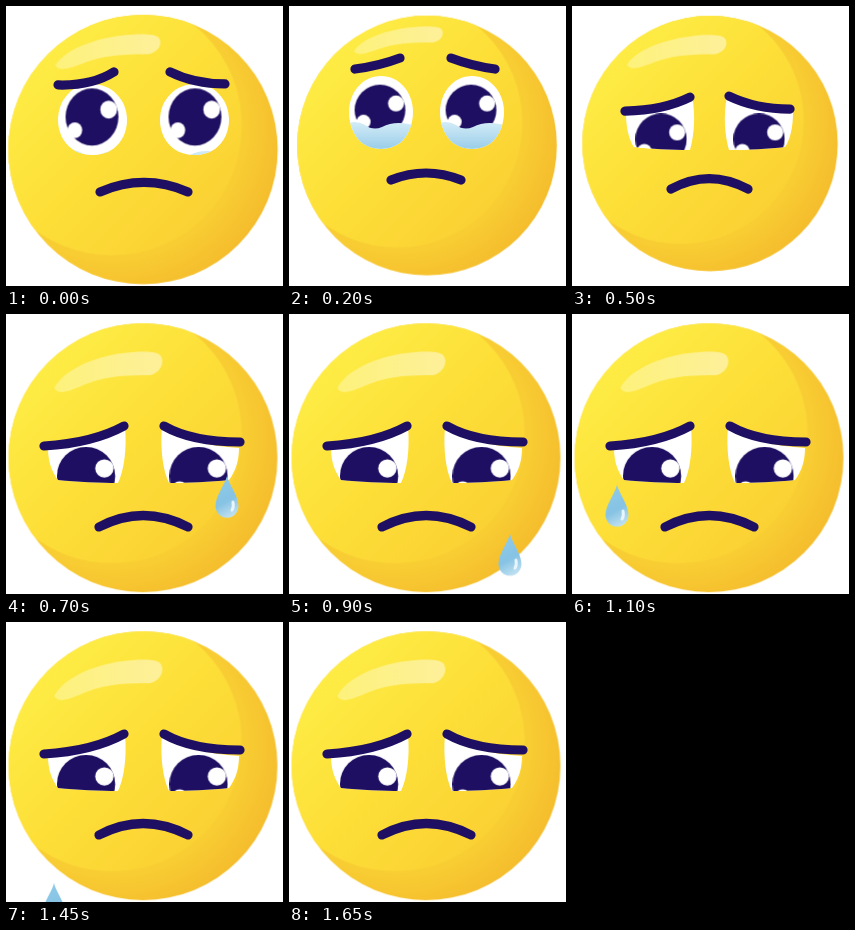
Animation, 277 px wide and 280 px high, one loop 1700 ms. Source, as an HTML page:

```html
<!DOCTYPE html>
<html lang="en">
<head>
<meta charset="utf-8">
<title>Crying face</title>
<style>
  html, body { margin: 0; width: 100%; height: 100%; overflow: hidden; background: #fff; }
  svg { display: block; width: 100vw; height: 100vh; }

  svg * { animation: 1700ms linear infinite; }
  .line { fill: none; stroke: #1f0f62; stroke-width: 9.2; stroke-linecap: round; }
  .white { fill: #fff; }
  .navy { fill: #1f0f62; }

  .face { animation-name: face; }
  .shine { animation-name: shine; }
  .eye { animation-name: eye; }
  .brow-l { animation-name: brow-l; }
  .brow-r { animation-name: brow-r; }
  .mouth { animation-name: mouth; }
  .pupil-l { animation-name: pupil-l; }
  .pupil-r { animation-name: pupil-r; }
  .water { animation-name: water; }
  .tear-r { animation-name: tear-r; }
  .tear-l { animation-name: tear-l; }

  /* Easing of the three moves between poses */
  svg { --rise: ease-out; --sink: cubic-bezier(.55, 0, .85, .65); --settle: ease-out; }

  /* Poses: wide-eyed 0, welling up 200 ms, squint 500 ms, sad from 700 ms */
  @keyframes face {
    0% { transform: translate(137px, 143.5px) scale(.998); animation-timing-function: var(--rise); }
    11.765% { transform: translate(138px, 139.5px) scale(.962); animation-timing-function: var(--sink); }
    29.412% { transform: translate(138px, 137.5px) scale(.946); animation-timing-function: var(--settle); }
    41.176%, 100% { transform: translate(137px, 143.7px) scale(.996); }
  }
  @keyframes shine {
    0% { transform: translate(17px, -116px) scale(.97, .86); animation-timing-function: var(--rise); }
    11.765% { transform: translate(16px, -124px) scale(.85, .7); animation-timing-function: var(--sink); }
    29.412% { transform: translate(17px, -115px) scale(.97, .86); animation-timing-function: var(--settle); }
    41.176%, 100% { transform: translate(19px, -107px); }
  }
  @keyframes eye {
    0% { d: path("M52 114C52 93 67 78 86 78C105 78 121 93 121 114C121 126 116 136 107 143C95 151 78 151 66 143C57 136 52 126 52 114Z"); animation-timing-function: var(--rise); }
    11.765% { d: path("M60 106C60 86 74 70 92 70C110 70 124 86 124 106C124 119 119 130 111 137C100 145 84 145 73 137C65 130 60 119 60 106Z"); animation-timing-function: var(--sink); }
    29.412% { d: path("M54 106C66 106 78 104 88 101C100 98 110 94 120 90C124 110 122 130 118 144C100 144 78 143 62 141C57 134 54 122 54 106Z"); animation-timing-function: var(--settle); }
    41.176%, 100% { d: path("M42 134C58 133 72 131 86 127C99 123 110 118 119 113C121 135 118 157 112 169C95 169 70 168 52 166C46 158 42 148 42 134Z"); }
  }
  @keyframes brow-l {
    0% { d: path("M52 79Q86 80 108 66"); animation-timing-function: var(--rise); }
    11.765% { d: path("M66 63Q90 60 111 52"); animation-timing-function: var(--sink); }
    29.412% { d: path("M53 105Q92 104 118 91"); animation-timing-function: var(--settle); }
    41.176%, 100% { d: path("M38 132Q87 129 118 112"); }
  }
  @keyframes brow-r {
    0% { d: path("M164 66Q188 78 219 78"); animation-timing-function: var(--rise); }
    11.765% { d: path("M162 52Q183 60 206 63"); animation-timing-function: var(--sink); }
    29.412% { d: path("M157 90Q184 103 218 103"); animation-timing-function: var(--settle); }
    41.176%, 100% { d: path("M158 112Q186 128 234 128"); }
  }
  @keyframes mouth {
    0% { d: path("M94 186Q138 167 182 186"); animation-timing-function: var(--rise); }
    11.765% { d: path("M102 174Q137 160 172 174"); animation-timing-function: var(--sink); }
    29.412% { d: path("M99 183Q137 162 176 183"); animation-timing-function: var(--settle); }
    41.176%, 100% { d: path("M93 213Q137 190 182 213"); }
  }
  @keyframes pupil-l {
    0% { transform: translate(86px, 111px) scale(.98, 1.06); animation-timing-function: var(--rise); }
    11.765% { transform: translate(91px, 104px) scale(.94); animation-timing-function: var(--sink); }
    29.412% { transform: translate(89px, 133px) scale(.95); animation-timing-function: var(--settle); }
    41.176%, 100% { transform: translate(80px, 162px) scale(1.08); }
  }
  @keyframes pupil-r {
    0% { transform: translate(189px, 111px) scale(.98, 1.06); animation-timing-function: var(--rise); }
    11.765% { transform: translate(182px, 104px) scale(.94); animation-timing-function: var(--sink); }
    29.412% { transform: translate(187px, 133px) scale(.95); animation-timing-function: var(--settle); }
    41.176%, 100% { transform: translate(192.5px, 162px) scale(1.08); }
  }
  @keyframes water {
    0% { transform: translateY(28px); opacity: 1; animation-timing-function: var(--rise); }
    11.765%, 18% { transform: none; opacity: 1; }
    26%, 100% { transform: translateY(18px); opacity: 0; }
  }
  @keyframes tear-r {
    0%, 35.294% { transform: translate(221px, 164px) scale(0); animation-timing-function: ease-out; }
    41.176% { transform: translate(221px, 182px) scale(1); animation-timing-function: cubic-bezier(.4, .15, .8, .8); }
    62%, 100% { transform: translate(221px, 305px) scale(1); }
  }
  @keyframes tear-l {
    0%, 58.824% { transform: translate(48px, 168px) scale(0); animation-timing-function: ease-out; }
    64.706% { transform: translate(45px, 191px) scale(1); animation-timing-function: cubic-bezier(.4, .15, .8, .8); }
    85.294% { transform: translate(48px, 281px) scale(1); }
    88.235%, 100% { transform: translate(48px, 305px) scale(1); }
  }
</style>
</head>
<body>
<svg viewBox="0 0 277 280" preserveAspectRatio="none">
  <defs>
    <linearGradient id="skin" x1=".2" y1=".2" x2=".9" y2=".9">
      <stop offset="0" stop-color="#feee46"/>
      <stop offset=".5" stop-color="#fddf38"/>
      <stop offset="1" stop-color="#fbd033"/>
    </linearGradient>
    <radialGradient id="shade" gradientUnits="userSpaceOnUse" cx="-31" cy="-24" r="174">
      <stop offset=".74" stop-color="#f9cf34"/>
      <stop offset="1" stop-color="#f5bd2d"/>
    </radialGradient>
    <linearGradient id="glow" x1="0" y1="0" x2="1" y2="0">
      <stop offset="0" stop-color="#fef27c"/>
      <stop offset="1" stop-color="#fdf09a"/>
    </linearGradient>
    <linearGradient id="wet" x1="0" y1="0" x2="0" y2="1">
      <stop offset="0" stop-color="#d3ecf7"/>
      <stop offset=".5" stop-color="#9fd0ea"/>
    </linearGradient>
    <linearGradient id="drop" x1=".3" y1="0" x2=".6" y2="1">
      <stop offset="0" stop-color="#8fcae8"/>
      <stop offset=".6" stop-color="#86c3e4"/>
      <stop offset="1" stop-color="#c0e1f1"/>
    </linearGradient>
    <clipPath id="disc"><circle r="135"/></clipPath>
    <clipPath id="lid-l"><path class="eye" d="M52 114Z"/></clipPath>
    <clipPath id="lid-r"><path class="eye" d="M52 114Z" transform="translate(275 0) scale(-1 1)"/></clipPath>
    <g id="pupil">
      <circle class="navy" r="27"/>
      <circle class="white" cx="17" cy="-7" r="8.5"/>
      <circle class="white" cx="-17.5" cy="12.5" r="7.5"/>
    </g>
    <path id="pool" fill="url(#wet)" d="M54 119Q66 113 76 119Q84 125 93 121Q108 113 130 121V165H54Z"/>
    <g id="tear">
      <path fill="url(#drop)" d="M0-20C3-10 11.5 0 11.5 10A11 11 0 0 1-11.5 10C-11.5 0-3-10 0-20Z"/>
      <path fill="none" stroke="#e8f6fc" stroke-width="3" stroke-linecap="round" d="M6 6Q7 11 5 14"/>
    </g>
  </defs>

  <g class="face">
    <circle r="135" fill="url(#shade)"/>
    <g clip-path="url(#disc)">
      <circle cx="-31" cy="-24" r="130" fill="url(#skin)"/>
    </g>
    <path class="shine" fill="url(#glow)" d="M-108 37C-100 20-70 6-40 2C-24 0-4-1-1 5C3 12-2 22-12 24C-30 24-55 24-76 33C-88 38-104 46-108 37Z"/>
  </g>

  <path class="eye white" d="M52 114Z"/>
  <g clip-path="url(#lid-l)">
    <g class="pupil-l"><use href="#pupil"/></g>
    <g class="water"><use href="#pool"/></g>
  </g>

  <path class="eye white" d="M52 114Z" transform="translate(275 0) scale(-1 1)"/>
  <g clip-path="url(#lid-r)">
    <g class="pupil-r"><use href="#pupil"/></g>
    <g class="water"><use href="#pool" x="91"/></g>
  </g>

  <path class="line brow-l" d="M52 79Q86 80 108 66"/>
  <path class="line brow-r" d="M164 66Q188 78 219 78"/>
  <path class="line mouth" d="M94 186Q138 167 182 186"/>

  <g class="tear-r"><use href="#tear"/></g>
  <g class="tear-l"><use href="#tear"/></g>
</svg>
</body>
</html>
```
